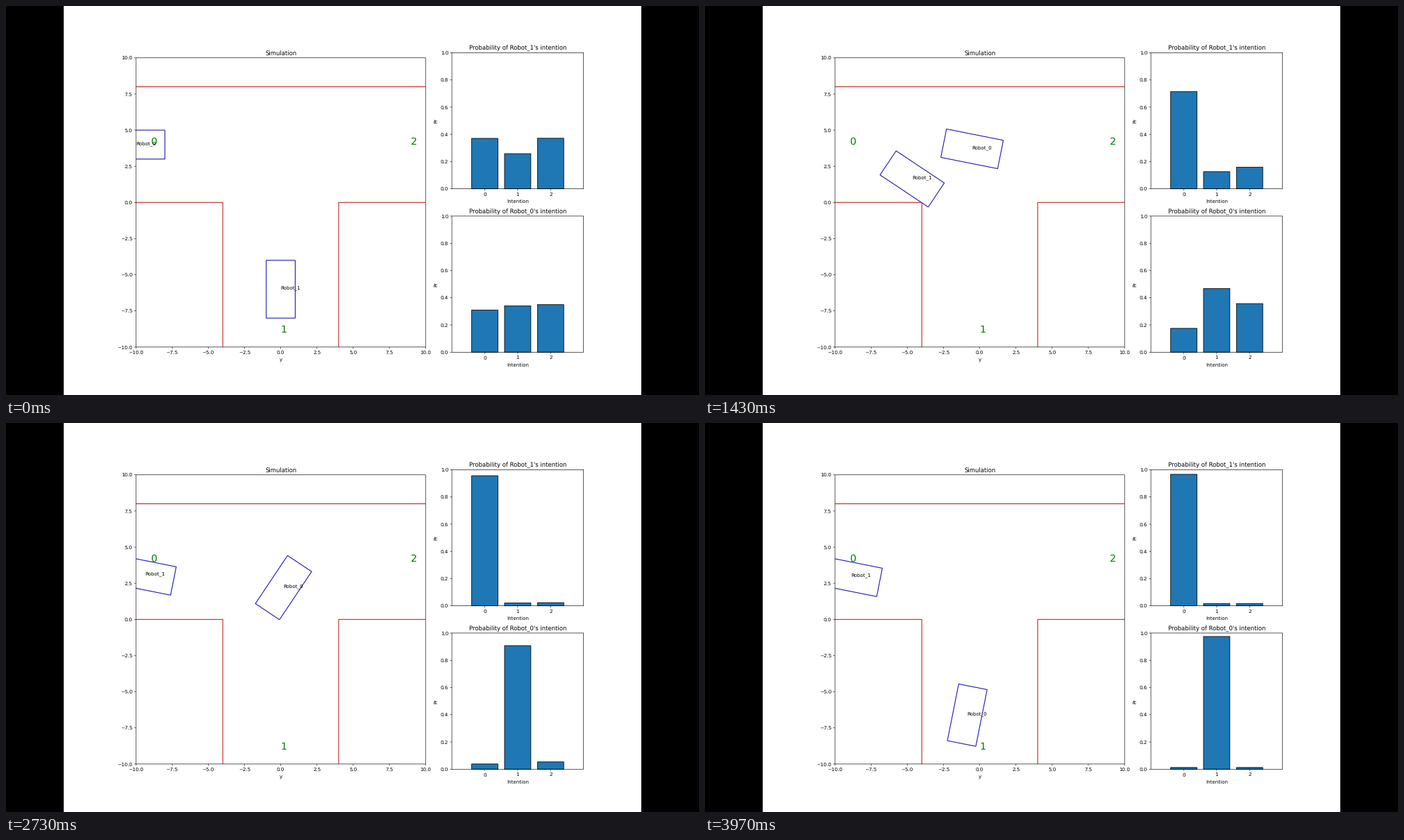
Animation of 998 by 561 pixels, one loop 4010 ms. Source, as a matplotlib script:

```python
import numpy as np
import matplotlib.pyplot as plt
from matplotlib.animation import FuncAnimation
from matplotlib.patches import Polygon, Rectangle

W, H, DPI = 998, 561, 64
PT = 72 / DPI                      # points per pixel
LOOP_MS, TICK_MS = 4010, 10
SMALL, MEDIUM, LARGE = 7.11, 8.53, 14.22
RED, BLUE, GREEN, BAR = "#c4201c", "#1c16b4", "#008000", "#1f77b4"
TURN, STEP = np.pi / 16, 0.5

plt.rcParams.update({"font.family": "DejaVu Sans", "text.hinting": "none",
                     "path.snap": False})
fig = plt.figure(figsize=(W / DPI, H / DPI), dpi=DPI, facecolor="black")
ax = fig.add_axes([0, 0, 1, 1])
ax.set_xlim(0, W)
ax.set_ylim(H, 0)
ax.axis("off")

# The white page, and a 2 x 3 layout inside its margins.
PAGE_W = 831.7
PAGE_X = (W - PAGE_W) / 2
LEFT, RIGHT = PAGE_X + 0.125 * PAGE_W, PAGE_X + 0.9 * PAGE_W
TOP, BOTTOM = 0.12 * H, 0.89 * H
COL, ROW = (RIGHT - LEFT) / 3.4, (BOTTOM - TOP) / 2.2
SIDE = 2.2 * COL
ax.add_patch(Rectangle((PAGE_X, 0), PAGE_W, H, color="white", lw=0, zorder=0))


def text(x, y, s, size=SMALL, ha="center", va="baseline", **kw):
    return ax.text(x, y, s, fontsize=size * PT, ha=ha, va=va, **kw)


def signed(v):
    return f"{v:.1f}".replace("-", "\u2212")


class Panel:
    """A framed plot with its own data scale, placed in pixels."""

    def __init__(self, x0, y0, w, h, xlim, ylim, title, xlabel, xticks, yticks, fmt):
        self.x0, self.y1, self.xlim, self.ylim = x0, y0 + h, xlim, ylim
        self.sx, self.sy = w / (xlim[1] - xlim[0]), h / (ylim[1] - ylim[0])
        self.frame = ax.add_patch(Rectangle((x0, y0), w, h, fill=False,
                                            lw=0.65 * PT, ec="black", zorder=2.5))
        style = dict(color="black", lw=0.6 * PT)
        ax.vlines([self.x(v) for v in xticks], self.y1, self.y1 + 2.5, **style)
        ax.hlines([self.y(v) for v in yticks], x0 - 2.5, x0, **style)
        for v in xticks:
            text(self.x(v), self.y1 + 10.2, fmt(v))
        for v in yticks:
            text(x0 - 5, self.y(v) + 2.6, signed(v), ha="right")
        text(x0 + w / 2, y0 - 4.3, title, MEDIUM)
        text(x0 + w / 2, self.y1 + 20.6, xlabel)

    def x(self, v):
        return self.x0 + (v - self.xlim[0]) * self.sx

    def y(self, v):
        return self.y1 - (v - self.ylim[0]) * self.sy


class Chart:
    """Belief over three goals: one goal follows a logistic curve,
    the other two share what is left."""

    def __init__(self, top, name, lead, logit, share):
        self.lead, self.logit, self.share = lead, logit, share
        self.panel = Panel(RIGHT - COL, top, COL, ROW, (-1, 3), (0, 1),
                           f"Probability of {name}'s intention", "Intention",
                           range(3), np.arange(0, 1.1, 0.2), str)
        text(619, top + ROW / 2, "Pr", va="center", rotation=90)
        self.bars = [ax.add_patch(Rectangle((self.panel.x(i - 0.4), self.panel.y1),
                                            0.8 * self.panel.sx, 0, fc=BAR,
                                            ec="black", lw=0.8 * PT))
                     for i in range(3)]

    def show(self, f):
        p = 1 / (1 + np.exp(-np.interp(f, *self.logit)))
        s = np.interp(f, *self.share)
        probs = [(1 - p) * s, (1 - p) * (1 - s)]
        probs.insert(self.lead, p)
        for bar, v in zip(self.bars, probs):
            bar.set_height(-v * self.panel.sy)


class Robot:
    """Drives in equal steps; the heading snaps to 1/32 turns."""

    def __init__(self, name, x, y, odometer, steering, reverse):
        self.odometer = odometer
        self.poses = []
        for k in range(odometer[1][-1] + 1):
            a = np.round(np.interp(k, *steering)) * TURN
            self.poses.append((x, y, a))
            d = STEP if k < reverse else -STEP
            x, y = x + d * np.cos(a), y + d * np.sin(a)
        self.body = ax.add_patch(Polygon(np.zeros((4, 2)), fill=False, ec=BLUE,
                                         lw=1.1 * PT, joinstyle="miter"))
        self.body.set_clip_path(sim.frame)
        self.label = text(0, 0, name, ha="left")

    def show(self, f):
        x, y, a = self.poses[int(np.interp(f, *self.odometer) + 1e-6)]
        c, s = np.cos(a), np.sin(a)
        corners = [(2, 1), (-2, 1), (-2, -1), (2, -1)]
        self.body.set_xy([(sim.x(x + u * c - v * s), sim.y(y + u * s + v * c))
                          for u, v in corners])
        self.label.set_position((sim.x(x), sim.y(y)))


grid = np.arange(-10, 10.1, 2.5)
sim = Panel(LEFT, (TOP + BOTTOM - SIDE) / 2, SIDE, SIDE, (-10, 10), (-10, 10),
            "Simulation", "y", grid, grid, signed)

walls = [([-10, 10], [8, 8])] + [([s * 10, s * 4, s * 4], [0, 0, -10]) for s in (-1, 1)]
for xs, ys in walls:
    ax.plot([sim.x(v) for v in xs], [sim.y(v) for v in ys], color=RED,
            lw=1.1 * PT, solid_capstyle="butt", solid_joinstyle="miter")
for goal, (gx, gy) in enumerate([(-9, 4), (0, -9), (9, 4)]):
    text(sim.x(gx), sim.y(gy), str(goal), LARGE, ha="left", color=GREEN)

# Odometer: picture -> steps driven. Steering: step -> heading.
actors = [
    Robot("Robot_0", -10, 4,
          odometer=([3, 30, 57, 72, 93, 119], [0, 15, 25, 29, 37, 50]),
          steering=([15, 16, 26, 34, 36, 37, 46, 47], [0, -1, -1, 7, 7, 8, 8, 7]),
          reverse=26),
    Robot("Robot_1", 0, -6,
          odometer=([0, 14, 30, 57, 72, 113, 115], [0, 7, 14, 25, 29, 29, 30]),
          steering=([2, 5, 13, 14, 20, 22, 24, 25, 28, 29],
                    [8, 9.6, 12.1, 13, 13, 15, 15, 16, 14, 15]),
          reverse=29),
    Chart(TOP, "Robot_1", 0,
          logit=([0, 14, 30, 57, 93, 119], [-0.53, -0.41, 0.35, 1.53, 3.75, 3.35]),
          share=([0, 119], [0.41, 0.5])),
    Chart(BOTTOM - ROW, "Robot_0", 1,
          logit=([14, 30, 57, 72, 93], [-0.66, -0.52, 0.29, 1.05, 3.65]),
          share=([14, 30, 119], [0.47, 0.3, 0.5])),
]


def update(i):
    f = int((i * TICK_MS + 4) * 0.03)      # 30 pictures per second
    if f < 17:
        f -= f % 2                         # half rate at the start
    for actor in actors:
        actor.show(f)
    return []


anim = FuncAnimation(fig, update, frames=LOOP_MS // TICK_MS, interval=TICK_MS,
                     repeat=True, repeat_delay=0, blit=False)
plt.show()
```
